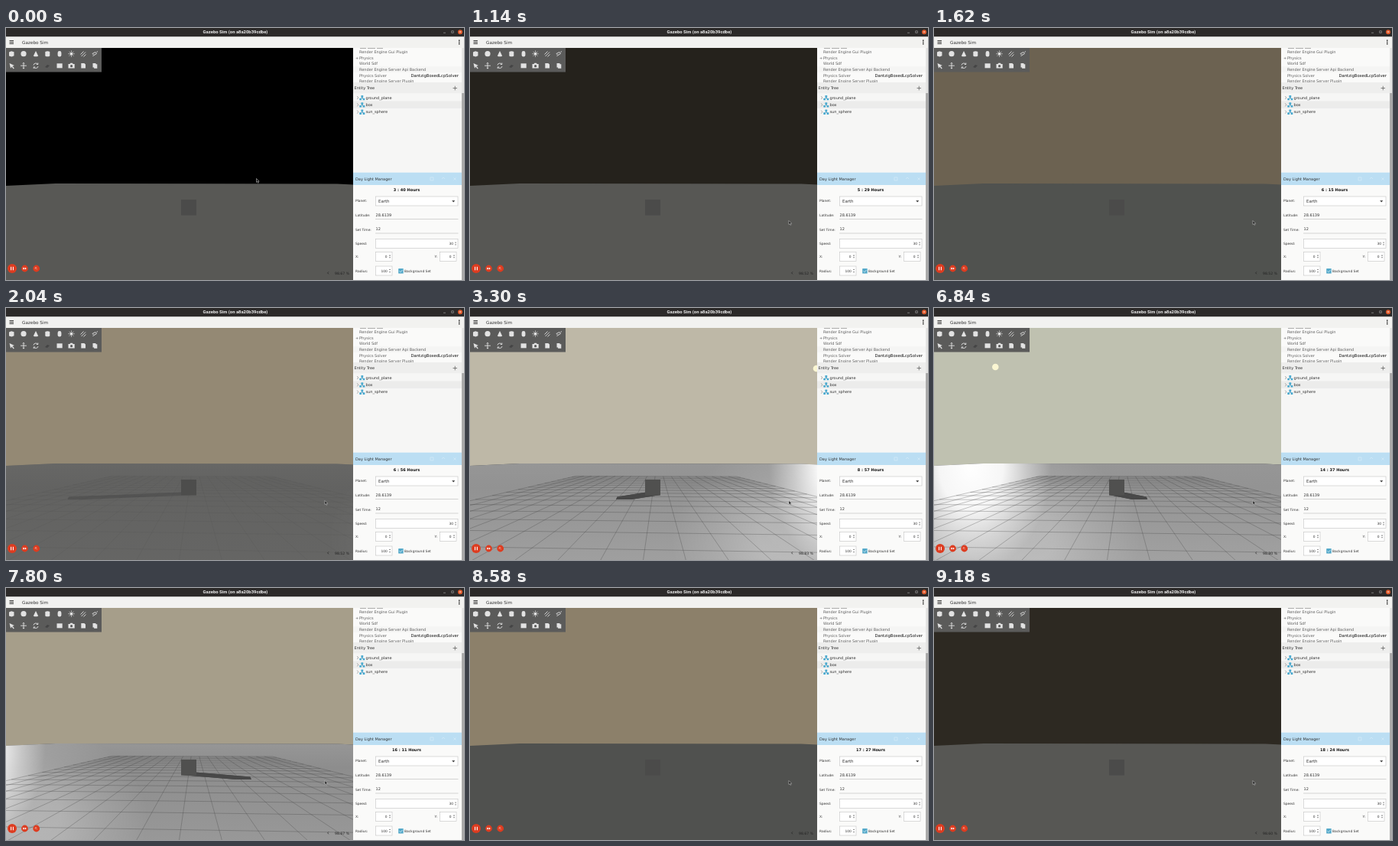
An HTML page with a canvas for the animation above (9240 ms loop, 599x329 px).

```html
<!DOCTYPE html>
<html lang="en">
<head>
<meta charset="utf-8">
<title>Day Light Manager</title>
<style>
  html, body { margin: 0; width: 100%; height: 100%; overflow: hidden; background: #fafafa; }
  canvas, svg { position: absolute; left: 0; top: 0; width: 599px; height: 329px; }
  text { font: 5px "DejaVu Sans", sans-serif; fill: #333; }
  .dim { fill: #606060; }
  .label { font-size: 4.4px; }
  .bold { font-weight: bold; fill: #111; }
  .title { font: bold 5.9px Roboto, sans-serif; fill: #eee; }
  .line { fill: none; stroke: #777; stroke-width: .6; }
  .field { fill: #fff; stroke: #c4c4c4; stroke-width: .6; }
  .icons { fill: #e2e2e2; }
  .icons .stroke { fill: none; stroke: #e2e2e2; stroke-width: .9; }
</style>
</head>
<body>
<canvas id="scene" width="599" height="329"></canvas>
<svg viewBox="0 0 599 329">
  <defs>
    <clipPath id="inspector"><rect x="454" y="26" width="145" height="45"/></clipPath>
    <g id="node">
      <path d="M0-2L1.5 0L0 2" class="line" transform="translate(-6.5 0)"/>
      <path d="M0-2V0M-2 2L0 0L2 2" fill="none" stroke="#378fb5" stroke-width="1"/>
      <path d="M-1.4-3H1.4V-.4H-1.4ZM-3.5 .7H-.8V3.3H-3.5ZM.8 .7H3.5V3.3H.8Z" fill="#48a9cf"/>
    </g>
    <path id="spin" d="M-1.2-.9L0-2.3L1.2-.9ZM-1.2 .9L0 2.3L1.2 .9Z" fill="#666"/>
  </defs>

  <!-- window chrome -->
  <rect width="599" height="11.5" fill="#2c2a29"/>
  <text class="title" x="300" y="7.3" text-anchor="middle">Gazebo Sim (on a8a20b39cdbe)</text>
  <path d="M572 6.3h3M582.7 3.8h2.6v2.6h-2.6z" fill="none" stroke="#aaa" stroke-width=".6"/>
  <circle cx="594" cy="5.2" r="3" fill="#e25a2b"/>
  <path d="M593 4.2l2 2m0-2l-2 2" stroke="#fff" stroke-width=".6"/>
  <rect y="11.5" width="599" height="14.5" fill="#f2f2f0"/>
  <path d="M4.5 16.5h5.5M4.5 18.5h5.5M4.5 20.5h5.5" stroke="#222" stroke-width=".9"/>
  <text x="21" y="20.5" style="font-size:5.7px">Gazebo Sim</text>
  <path d="M592 15.5h1.4v1.4h-1.4zM592 17.8h1.4v1.4h-1.4zM592 20.1h1.4v1.4h-1.4z" fill="#222"/>

  <!-- tool bar -->
  <rect y="26" width="125" height="31.5" fill="#5b5b5a"/>
  <g class="icons">
    <path d="M4 31.5l3-1.3 3.5 1v5l-3 1.4-3.5-1z"/>
    <circle cx="23" cy="33.7" r="3.6"/>
    <path d="M39 30l3.2 6.4q-3.2 1.8-6.4 0z"/>
    <path d="M51.3 31q3-1.6 6 0v5.4q-3 1.8-6 0z"/>
    <rect x="67.6" y="30" width="4.8" height="7.6" rx="2.4"/>
    <circle cx="85.5" cy="33.7" r="2"/>
    <path class="stroke" d="M85.5 29.7v1.3m0 5.4v1.3M81.5 33.7h1.3m5.4 0h1.3M82.7 30.9l.9.9m3.8 3.8l.9.9m0-5.6l-.9.9m-3.8 3.8l-.9.9"/>
    <path class="stroke" d="M97.5 34.5l4-4M98.5 37l5.5-5.5M101.5 37.5l3-3"/>
    <path class="stroke" d="M113 33.5l4-2 1.5 2-3.5 2zM115 35.5l-1.5 1.5m5-5.5l1.5-1"/>
    <path d="M4.5 46l6.5 3-2.6.8 2.4 2.7-1 .9-2.4-2.8-1.3 2.2z"/>
    <path class="stroke" d="M23 45.3v7.8M19.1 49.2h7.8M21.8 46.5l1.2-1.2 1.2 1.2m-2.4 5.4l1.2 1.2 1.2-1.2"/>
    <path class="stroke" d="M36 48.5a3.1 3.1 0 0 1 5.7-1M42 50a3.1 3.1 0 0 1-5.7 1M41.8 45.5v2h-2m-3.6 5.5v-2h2"/>
    <path d="M51 51l3-3 3 1-3 3z" fill="#444"/>
    <rect x="66.5" y="46.3" width="7.2" height="6"/>
    <path d="M81.5 47h2l.8-1.2h2.6l.8 1.2h2v5.5h-8.2z"/>
    <circle cx="85.6" cy="49.7" r="1.6" fill="#5b5b5a"/>
    <path d="M98.3 46h4l1.7 1.6v5h-5.7z"/>
    <path d="M113.5 46h4v1.2h1.8v5.6h-4.2v-1.4h-1.6z"/>
  </g>

  <!-- side panel -->
  <rect x="454" y="26" width="145" height="303" fill="#fafaf9"/>
  <rect x="454" y="50.3" width="142" height="7.6" fill="#f5f5f4"/>
  <g clip-path="url(#inspector)">
    <path d="M463 26.5h8m2 0h10m2 0h8" class="line"/>
    <text class="dim" x="462" y="33.3">Render Engine Gui Plugin</text>
    <text class="dim" x="457" y="40.8">+</text>
    <text class="dim" x="462" y="40.8">Physics</text>
    <text class="dim" x="462" y="48.4">World Sdf</text>
    <text class="dim" x="462" y="56">Render Engine Server Api Backend</text>
    <text class="dim" x="462" y="63.5">Physics Solver</text>
    <text x="592" y="63.5" text-anchor="end" style="font-size:5.3px;fill:#111">DantzigBoxedLcpSolver</text>
    <text class="dim" x="462" y="71">Render Engine Server Plugin</text>
  </g>
  <rect x="454" y="71" width="145" height="14.5" fill="#eeeeed"/>
  <text x="455.5" y="80.3">Entity Tree</text>
  <path d="M584.5 78.5h5.5m-2.75-2.75v5.5" stroke="#555" stroke-width=".7"/>
  <rect x="454" y="85.5" width="142" height="103.5" fill="#f6f6f5"/>
  <rect x="454" y="95.5" width="142" height="9.3" fill="#ececeb"/>
  <use href="#node" x="465.8" y="91"/><text x="470.5" y="92.5">ground_plane</text>
  <use href="#node" x="465.8" y="100.3"/><text x="470.5" y="101.8">box</text>
  <use href="#node" x="465.8" y="109.6"/><text x="470.5" y="111.1">sun_sphere</text>
  <rect x="454" y="188.7" width="142" height="16.3" fill="#bbdef3"/>
  <text x="457" y="198.6">Day Light Manager</text>
  <path d="M555 195h4v4h-4zM570 197l2-2 2 2M585.5 195.5l3 3m0-3l-3 3" fill="none" stroke="#d3eaf7" stroke-width=".8"/>
  <rect x="596" y="26" width="3" height="303" fill="#e4e4e3"/>
  <rect x="596" y="85" width="3" height="244" fill="#aaa"/>

  <!-- manager form -->
  <text class="bold" id="clock" x="524" y="213.2" text-anchor="middle"></text>
  <text class="label" x="457" y="227.3">Planet:</text>
  <rect class="field" x="483.5" y="220" width="107.5" height="12"/>
  <text x="487" y="228" style="font-size:5.4px">Earth</text>
  <path d="M583.2 225.2l2 2.2 2-2.2z" fill="#333"/>
  <text class="label" x="457" y="246.3">Latitude:</text>
  <text x="483.5" y="245.7">28.6139</text>
  <path d="M483 249.5h108.5M483 268h108.5" stroke="#bbb" stroke-width=".6"/>
  <text class="label" x="457" y="265.2">Set Time:</text>
  <text x="483.5" y="264.4">12</text>
  <text class="label" x="457" y="282.8">Speed:</text>
  <rect class="field" x="483.5" y="275.5" width="107.5" height="12"/>
  <text class="label" x="585" y="283.2" text-anchor="end">30</text><use href="#spin" x="588" y="281.5"/>
  <text class="label" x="457" y="300">X:</text>
  <rect class="field" x="483.5" y="292.3" width="21.5" height="12"/>
  <text class="label" x="498.5" y="300" text-anchor="end">0</text><use href="#spin" x="502" y="298.3"/>
  <text class="label" x="560.5" y="300">Y:</text>
  <rect class="field" x="567.5" y="292.3" width="21.5" height="12"/>
  <text class="label" x="582.5" y="300" text-anchor="end">0</text><use href="#spin" x="586" y="298.3"/>
  <text class="label" x="457" y="318.8">Radius:</text>
  <rect class="field" x="483.5" y="311" width="21.5" height="12"/>
  <text class="label" x="498.8" y="318.8" text-anchor="end">100</text><use href="#spin" x="502" y="317"/>
  <rect x="513.2" y="314" width="6.5" height="6.5" rx=".6" fill="#55a9ca"/>
  <path d="M514.5 317.2l1.5 1.6 2.6-3" fill="none" stroke="#d8ecf4" stroke-width=".8"/>
  <text class="label" x="521" y="318.8">Background Set</text>

  <!-- playback controls -->
  <g fill="#dd3c20">
    <circle cx="8" cy="314" r="6"/><circle cx="24.5" cy="314" r="4.4"/><circle cx="39.7" cy="314" r="4.4"/>
  </g>
  <path d="M6.6 311.7v4.6M9.4 311.7v4.6" stroke="#fff" stroke-width="1.1"/>
  <path d="M22.3 312.4l2.2 1.6-2.2 1.6zM24.7 312.4l2.2 1.6-2.2 1.6z" fill="#fff"/>
  <path d="M38.2 312.7l2.8 2.6m-2.8-.4v-2.2h2.2" fill="none" stroke="#f3b9ae" stroke-width=".6"/>
  <path d="M422 318.3l-1.4 1.5 1.4 1.5" fill="none" stroke="#222" stroke-width=".7"/>
  <text id="rate" x="449" y="321.5" text-anchor="end" style="font-size:4.6px;fill:#222"></text>
  <path id="cursor" d="M0 0v5l1.2-1 .9 1.8.9-.5-.9-1.6h1.5z" fill="#111" stroke="#ddd" stroke-width=".5"/>
</svg>
<script>
const LOOP = 9240, STEP = 60, VIEW = 454, HEIGHT = 329, NOON = 720;
const ctx = document.getElementById('scene').getContext('2d');
const [clock, rate, cursor] = ['clock', 'rate', 'cursor'].map(id => document.getElementById(id));

// Each key is [position, values...]
const MINUTES = [[0, 220], [1620, 375], [3300, 537], [4920, 693], [6840, 877], [8580, 1047], [9180, 1104]];
const RATES = [[0, '98.67'], [900, '98.52'], [2400, '98.83'], [5900, '98.80'], [7700, '98.67'], [8900, '98.60']];
const SKY = [[0, 196, 216, 213], [27, 195, 214, 211], [157, 191, 193, 176], [183, 190, 184, 167],
             [327, 140, 128, 106], [345, 108, 98, 81], [384, 45, 41, 34], [425, 0, 0, 0]];
const NIGHT_GROUND = [[300, 80, 80, 78], [345, 80, 82, 79], [384, 87, 87, 84], [500, 88, 88, 85]];

const clamp = v => Math.max(0, Math.min(1, v));
const ease = v => v * v * (3 - 2 * v);
const rgb = c => `rgb(${c.map(Math.round)})`;

function sample(keys, at) {
  if (at <= keys[0][0]) return keys[0].slice(1);
  const i = keys.findIndex(k => k[0] >= at);
  if (i < 0) return keys[keys.length - 1].slice(1);
  const a = keys[i - 1], b = keys[i], f = (at - a[0]) / (b[0] - a[0]);
  return a.slice(1).map((v, n) => v + (b[n + 1] - v) * f);
}

function trace(points) {
  ctx.beginPath();
  points.forEach(([x, y]) => ctx.lineTo(x, y));
}

function fillPolygon(points, color) {
  trace(points);
  ctx.fillStyle = color;
  ctx.fill();
}

// Ground metres to view pixels, with the box at the origin
function project(x, z) {
  const yaw = 0.03;
  const depth = 11.5 + z * Math.cos(yaw) - x * Math.sin(yaw);
  const side = x * Math.cos(yaw) + z * Math.sin(yaw);
  return [239 + 226 * side / depth, 194.3 + 546 / depth];
}

function sunPosition(d) {
  const a = d + 183, b = a * (d + 27);
  return [453 - 1.179 * a + 0.00045 * b, 79 - 0.25 * a + 0.001327 * b];
}

function drawSun(x, y) {
  ctx.beginPath();
  ctx.arc(x, y, 4.3, 0, 7);
  ctx.fillStyle = '#faf6d2';
  ctx.fill();
}

function drawGlow(x, y, rx, ry, strength) {
  ctx.save();
  ctx.translate(x, y);
  ctx.scale(rx, ry);
  const glow = ctx.createRadialGradient(0, 0, 0, 0, 0, 1);
  [[0, 1], [0.4, 0.9], [0.7, 0.4], [1, 0]]
    .forEach(([at, a]) => glow.addColorStop(at, `rgba(255,255,255,${a * strength})`));
  ctx.fillStyle = glow;
  ctx.fillRect(-1, -1, 2, 2);
  ctx.restore();
}

function drawDaylight(d, sunX) {
  const high = Math.cos(d * Math.PI / NOON);
  const base = ctx.createLinearGradient(0, 203, 0, HEIGHT);
  [[0, 150], [0.25, 132 + 20 * high], [1, 138 + 30 * high]]
    .forEach(([at, v]) => base.addColorStop(at, rgb([v, v, v])));
  ctx.fillStyle = base;
  ctx.fillRect(0, 200, VIEW, HEIGHT);

  const low = clamp((Math.abs(d) - 27) / 130);
  drawGlow(sunX, 300, 190, 130, 0.3);
  drawGlow(239 + (sunX - 239) * 1.2, 205, 70 + 35 * low, 140, 0.42 + 0.58 * low);
}

function drawGrid() {
  ctx.beginPath();
  for (let i = -10; i <= 10; i++) {
    ctx.moveTo(...project(i, -10));
    ctx.lineTo(...project(i, 10));
    ctx.moveTo(...project(-10, i));
    ctx.lineTo(...project(10, i));
  }
  ctx.strokeStyle = 'rgba(60,60,60,.6)';
  ctx.lineWidth = 0.5;
  ctx.stroke();
}

function drawShadow(d) {
  const dx = 37 * Math.tan(d / 4 * Math.PI / 180), dy = 6;
  const base = [[229, 244], [249, 244], [247.5, 240.5], [230.5, 240.5]];
  const move = ([x, y]) => [x + dx, y + dy];
  fillPolygon(base.map(move), '#484848');
  base.forEach((p, i) => {
    const q = base[(i + 1) % 4];
    fillPolygon([p, q, move(q), move(p)], '#484848');
  });
}

function drawScene(minute) {
  const d = minute - NOON, away = Math.abs(d);
  const day = ease(clamp((325 - away) / 55));
  const [sunX, sunY] = sunPosition(d);

  ctx.save();
  ctx.beginPath();
  ctx.rect(0, 26, VIEW, HEIGHT);
  ctx.clip();
  ctx.fillStyle = rgb(sample(SKY, away));
  ctx.fillRect(0, 26, VIEW, HEIGHT);
  if (away < 260) drawSun(sunX, sunY);

  trace([[-50, -8], [-50, 50], [50, 50], [50, -8]].map(p => project(...p)));
  ctx.lineTo(VIEW, HEIGHT);
  ctx.lineTo(0, HEIGHT);
  ctx.clip();
  ctx.fillStyle = rgb(sample(NIGHT_GROUND, away));
  ctx.fillRect(0, 200, VIEW, HEIGHT);
  if (day > 0) {
    ctx.globalAlpha = day;
    drawDaylight(d, sunX);
    drawGrid();
    drawShadow(d);
    ctx.globalAlpha = 1;
  }
  const tone = 75 + 5 * day;
  ctx.fillStyle = rgb([tone, tone, tone - 1]);
  ctx.fillRect(229, 224, 20, 20.5);
  ctx.restore();
}

function frame(now) {
  const t = Math.floor(now % LOOP / STEP) * STEP;
  const minute = Math.round(sample(MINUTES, t)[0]);
  drawScene(minute);
  clock.textContent = `${Math.floor(minute / 60)} : ${String(minute % 60).padStart(2, '0')} Hours`;
  rate.textContent = RATES.filter(k => k[0] <= t).pop()[1] + ' %';
  const moved = ease(clamp((t - 300) / 600));
  cursor.setAttribute('transform', `translate(${327.5 + 89.5 * moved} ${196.5 + 55 * moved})`);
  requestAnimationFrame(frame);
}
requestAnimationFrame(frame);
</script>
</body>
</html>
```
